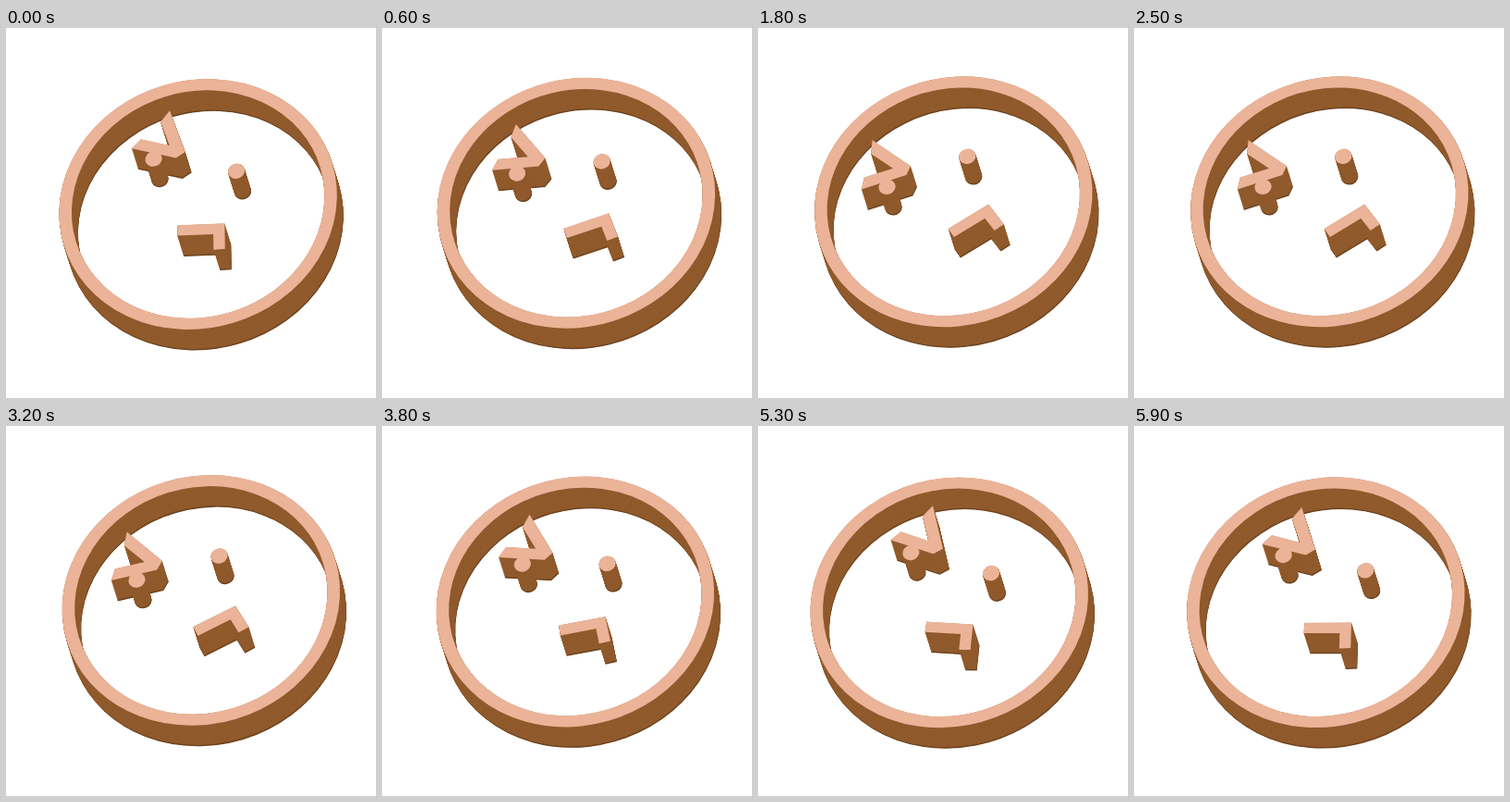
Write an HTML page with a canvas that moves like this. It is 400 px wide and 400 px high and loops after 6 s.

```html
<!DOCTYPE html>
<html lang="en">
<head>
<meta charset="utf-8">
<title>Swaying cutter</title>
<style>
  html, body { margin: 0; width: 100%; height: 100%; overflow: hidden; background: #fff; }
  canvas { display: block; width: 400px; height: 400px; }
</style>
</head>
<body>
<canvas id="stage" width="400" height="400"></canvas>
<script>
const ctx = document.getElementById('stage').getContext('2d');
const LOOP = 6000, STEP = 100;
const TOP = '#ebb398', SIDE = '#905a2c', RIM = '#6f4521';
const HEIGHT = 26.7, RIM_HEIGHT = 1.5;   // measured along the tilted plane
const PIVOT = [-0.9, -8.25];

function circle(x, y, r) {
  const p = new Path2D();
  p.arc(x, y, r, 0, 2 * Math.PI);
  return p;
}

function line(...points) {
  const p = new Path2D();
  points.forEach(([x, y]) => p.lineTo(x, y));
  return p;
}

// A shape with a width is stroked, the others are filled
const shapes = [
  { path: circle(0, 0, 144.85), width: 13.7 },
  { path: line([-0.5, -120], [2.7, -66], [-8.5, -62.2], [-51.8, -88.9],
               [-39.2, -96.4], [-11.5, -79], [-13.5, -110]) },
  { path: circle(-32.1, -68.9, 9.2) },
  { path: circle(49.9, -25.4, 9.2) },
  { path: line([-29.4, 23.6], [14.1, 36.3], [8.2, 60.3]), width: 12.5 }
];

function ease(t) {
  const s = Math.min(1, Math.max(0, t));
  return s * s * (3 - 2 * s);
}

// Sway in degrees: swing out, rest, swing back, rest
function sway(ms) {
  const SWING = 1800, LEFT = -32, SPAN = 39;
  const t = (ms - 2790 + LOOP) % LOOP;
  return LEFT + SPAN * (ease(t / SWING) - ease((t - 2750) / SWING));
}

function layer(depth, angle, color) {
  ctx.setTransform(0.955, -0.297, 0.262, 0.842, 207.7, 190.5);
  ctx.translate(PIVOT[0], PIVOT[1] + depth);
  ctx.rotate(angle);
  ctx.translate(-PIVOT[0], -PIVOT[1]);
  ctx.fillStyle = ctx.strokeStyle = color;
  for (const { path, width } of shapes) {
    ctx.lineWidth = width || 1;
    if (width) ctx.stroke(path);
    else ctx.fill(path);
  }
}

function draw(ms) {
  const angle = sway(ms) * Math.PI / 180;
  ctx.setTransform(1, 0, 0, 1, 0, 0);
  ctx.fillStyle = '#fff';
  ctx.fillRect(0, 0, 400, 400);
  for (let d = HEIGHT; d > 0; d -= 0.6) {
    layer(d, angle, d > HEIGHT - RIM_HEIGHT ? RIM : SIDE);
  }
  layer(0, angle, TOP);
}

let last = -1;
function tick() {
  const ms = Math.floor(performance.now() % LOOP / STEP) * STEP;
  if (ms !== last) draw(last = ms);
  requestAnimationFrame(tick);
}
tick();
</script>
</body>
</html>
```
